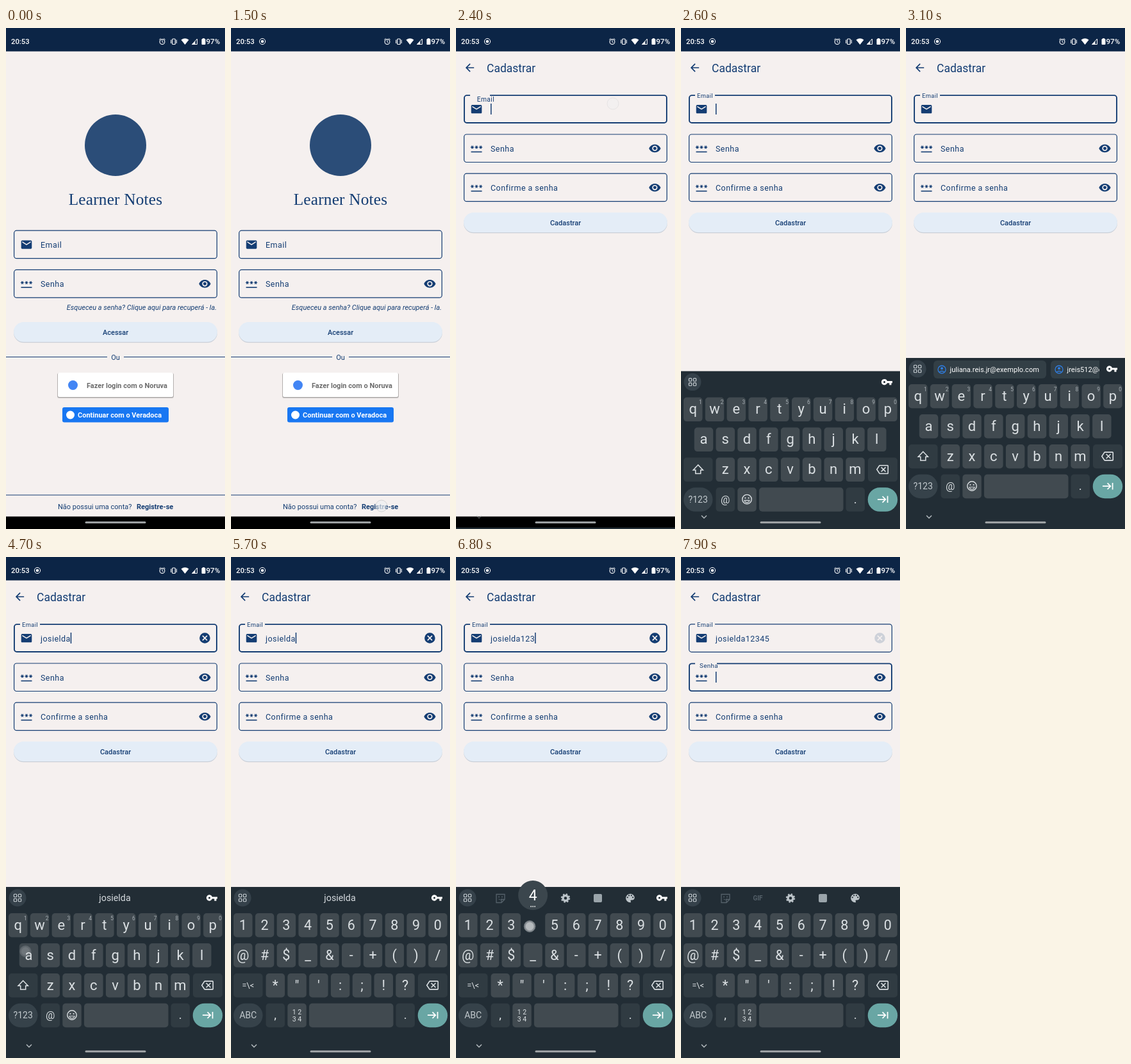
Write an HTML page that moves like this. It is 342 px wide and 782 px high and loops after 8 s.

```html
<!DOCTYPE html>
<html lang="pt">
<head>
<meta charset="utf-8">
<title>Cadastro</title>
<style>
html, body { margin: 0; width: 100%; height: 100%; overflow: hidden; background: #f5f0ef; }
svg { display: block; width: 342px; height: 782px; }
text { font-family: Roboto, "Noto Sans", sans-serif; white-space: pre; }
</style>
</head>
<body>
<svg id="stage" viewBox="0 0 342 782"></svg>
<script>
const INK = '#143d73', PAGE = '#f5f0ef', PALE = '#e4edf7', BAR = '#0c2546';
const KB = '#222d35', KEY = '#414a50', DARK = '#303b42', LIGHT = '#dbe0e3';
const LOOP = 8000;
const stage = document.getElementById('stage');

const ICON = {
  mail: 'M20 4H4c-1.1 0-2 .9-2 2v12c0 1.1.9 2 2 2h16c1.1 0 2-.9 2-2V6c0-1.1-.9-2-2-2zm0 4l-8 5-8-5V6l8 5 8-5v2z',
  eye: 'M12 4.5C7 4.5 2.7 7.6 1 12c1.7 4.4 6 7.5 11 7.5s9.3-3.1 11-7.5c-1.7-4.4-6-7.5-11-7.5zM12 17a5 5 0 1 1 0-10 5 5 0 0 1 0 10zm0-8a3 3 0 1 0 0 6 3 3 0 0 0 0-6z',
  back: 'M20 11H7.8l5.6-5.6L12 4l-8 8 8 8 1.4-1.4L7.8 13H20z',
  clear: 'M12 2a10 10 0 1 0 0 20 10 10 0 0 0 0-20zm5 13.6L15.6 17 12 13.4 8.4 17 7 15.6l3.6-3.6L7 8.4 8.4 7l3.6 3.6L15.6 7 17 8.4 13.4 12z',
  key: 'M12.6 10A6 6 0 1 0 12.6 14H17v4h4v-4h2v-4zM7 14a2 2 0 1 1 0-4 2 2 0 0 1 0 4z',
  erase: 'M22 3H7c-.7 0-1.2.4-1.6.9L0 12l5.4 8.1c.4.5.9.9 1.6.9h15c1.1 0 2-.9 2-2V5c0-1.1-.9-2-2-2zm0 16H7.1L2.4 12 7 5h15zM10.4 17L14 13.4l3.6 3.6 1.4-1.4-3.6-3.6L19 8.4 17.6 7 14 10.6 10.4 7 9 8.4l3.6 3.6L9 15.6z',
  palette: 'M12 3a9 9 0 0 0 0 18c.8 0 1.5-.7 1.5-1.5 0-.4-.1-.7-.4-1-.9-1-.2-2.5 1.1-2.5H16c2.8 0 5-2.2 5-5 0-4.4-4-8-9-8zm-5.5 9a1.5 1.5 0 1 1 0-3 1.5 1.5 0 0 1 0 3zm3-4a1.5 1.5 0 1 1 0-3 1.5 1.5 0 0 1 0 3zm5 0a1.5 1.5 0 1 1 0-3 1.5 1.5 0 0 1 0 3zm3 4a1.5 1.5 0 1 1 0-3 1.5 1.5 0 0 1 0 3z',
  shift: 'M12 3L2.5 13H7v7h10v-7h4.5z',
  enter: 'M2 12h15M11.5 6l6 6-6 6M21.5 5.5v13'
};

function set(node, attrs) {
  for (const name in attrs) node.setAttribute(name, attrs[name]);
}
function add(parent, tag, attrs = {}, text) {
  const node = document.createElementNS('http://www.w3.org/2000/svg', tag);
  set(node, attrs);
  if (text !== undefined) node.textContent = text;
  parent.appendChild(node);
  return node;
}
const group = (parent, attrs) => add(parent, 'g', attrs);
const rect = (parent, x, y, width, height, fill, rx = 0, more = {}) =>
  add(parent, 'rect', { x, y, width, height, fill, rx, ...more });
const circle = (parent, cx, cy, r, fill, more = {}) =>
  add(parent, 'circle', { cx, cy, r, fill, ...more });
const line = (parent, d, stroke, width = 1, more = {}) =>
  add(parent, 'path', { d, stroke, 'stroke-width': width, fill: 'none', ...more });
const label = (parent, x, y, size, fill, text, more = {}) =>
  add(parent, 'text', { x, y, 'font-size': size, fill, ...more }, text);
const MID = { 'text-anchor': 'middle' };
const icon = (parent, name, cx, cy, fill, scale = 0.83, more = {}) =>
  add(parent, 'path', { d: ICON[name], fill, transform: `translate(${cx - 12 * scale} ${cy - 12 * scale}) scale(${scale})`, ...more });
const fade = (node, opacity) => node.setAttribute('opacity', Number(opacity));
const ramp = (t, from, to) => Math.min(1, Math.max(0, (t - from) / (to - from)));
const easeOut = x => 1 - (1 - x) ** 3;

function passwordIcon(parent, y) {
  let d = '';
  for (const x of [25.4, 32, 38.6])
    for (let arm = 0; arm < 3; arm++) {
      const turn = Math.PI * arm / 3, dx = 2.6 * Math.cos(turn), dy = 2.6 * Math.sin(turn);
      d += `M${x - dx} ${y - 2 - dy}L${x + dx} ${y - 2 + dy}`;
    }
  line(parent, d, INK, 1.05);
  line(parent, `M23.5 ${y + 5.3}h17`, INK, 1.6);
}

// The stroke lies inside the box, so a thicker one grows inwards.
function outline(y, stroke, gap) {
  const i = stroke / 2, left = 12 + i, right = 330 - i, top = y + i, bottom = y + 44.7 - i;
  return `M${gap} ${top}H${right - 4}a4 4 0 0 1 4 4V${bottom - 4}a4 4 0 0 1-4 4H${left + 4}a4 4 0 0 1-4-4V${top + 4}a4 4 0 0 1 4-4H22`;
}

function field(parent, y, name, secret) {
  const border = line(parent, '', INK);
  if (secret) {
    passwordIcon(parent, y + 22.7);
    icon(parent, 'eye', 310.5, y + 22.5, INK);
  } else icon(parent, 'mail', 32, y + 22.5, INK);
  const hint = label(parent, 54, y, 12.5, INK, name);
  const gapEnd = secret ? 56 : 53;
  return function update(float, focused) {
    const stroke = focused ? 1.9 : 1.2;
    set(border, { d: outline(y, stroke, float > 0 ? gapEnd : 22), 'stroke-width': stroke });
    set(hint, {
      x: 54 - 29 * float, y: y + 27.2 - 22.4 * float,
      'font-size': 12.5 - 3.1 * float, 'letter-spacing': 0.45 - 0.1 * float
    });
  };
}

function pillButton(parent, y, text) {
  rect(parent, 12, y + 1.2, 318, 31, '#c9cfd8', 15.5);
  rect(parent, 12, y, 318, 31, PALE, 15.5);
  label(parent, 171, y + 19.5, 11, INK, text, { ...MID, 'font-weight': 500 });
}

// login page
const login = group(stage);
circle(login, 171, 183, 48, '#2b4d78');
label(login, 171, 276, 25.3, INK, 'Learner Notes', { ...MID, 'letter-spacing': 0.2, style: 'font-family:"Liberation Serif",serif' });
field(login, 315.6, 'Email', false)(0, false);
field(login, 376.8, 'Senha', true)(0, false);
label(login, 329, 440, 11, INK, 'Esqueceu a senha? Clique aqui para recuperá - la.', { 'text-anchor': 'end', 'font-style': 'italic' });
pillButton(login, 459, 'Acessar');
line(login, 'M0 513.5H158M184 513.5H342', INK, 1.2);
label(login, 171, 518, 11, INK, 'Ou', MID);
rect(login, 80, 538.5, 182, 39.5, '#000', 3, { opacity: 0.16 });
rect(login, 80.5, 538.5, 181, 38.3, '#000', 2, { opacity: 0.25 });
rect(login, 81, 538, 180, 38, '#fff', 2);
circle(login, 104.5, 557.5, 7.5, '#4285f4');
label(login, 126, 561.5, 11, '#6b6b6b', 'Fazer login com o Noruva', { 'font-weight': 600 });
rect(login, 88, 592, 166, 23.5, '#1877f2', 3);
circle(login, 100.5, 604, 6.5, '#fff');
label(login, 112, 608, 11, '#fff', 'Continuar com o Veradoca', { 'font-weight': 700 });
line(login, 'M0 729H342', INK, 1.2);
label(login, 81, 751, 11, INK, 'Não possui uma conta?');
label(login, 204, 751, 11, INK, 'Registre-se', { 'font-weight': 700 });

// sign-up page
const signup = group(stage);
rect(signup, 0, 36, 376, 746, PAGE);
icon(signup, 'back', 21.5, 62, INK);
label(signup, 48, 69, 17.5, INK, 'Cadastrar');
const emailField = field(signup, 104.2, 'Email', false);
const passField = field(signup, 165.4, 'Senha', true);
field(signup, 226.6, 'Confirme a senha', true)(0, false);
pillButton(signup, 288, 'Cadastrar');
const emailText = label(signup, 54, 131.5, 12.5, INK, '', { 'letter-spacing': 0.45 });
const clearIcon = icon(signup, 'clear', 310.5, 126.5, INK);
const caret = rect(signup, 54, 118, 1.5, 17, INK);

// status bar
rect(stage, 0, 0, 342, 36.5, BAR);
label(stage, 8, 25, 11.3, '#fff', '20:53', { 'font-weight': 500 });
const recorder = group(stage);
circle(recorder, 49, 21, 4.6, 'none', { stroke: '#fff' });
circle(recorder, 49, 21, 2.3, '#fff');
circle(stage, 244, 21.5, 3.9, 'none', { stroke: '#fff', 'stroke-width': 1.1 });
line(stage, 'M244 19v2.7l1.7 1M239.3 18.3l2.3-2M248.7 18.3l-2.3-2', '#fff');
rect(stage, 259.7, 17, 4.6, 8.5, 'none', 1, { stroke: '#fff', 'stroke-width': 1.2 });
line(stage, 'M257.7 18.5v5.5M266.3 18.5v5.5', '#fff', 1.1);
add(stage, 'path', { d: 'M279.5 26L273.5 18.5q6-4.5 12 0z', fill: '#fff' });
line(stage, 'M290.5 25.5h8v-8.5z', '#fff', 1);
add(stage, 'path', { d: 'M290.5 25.5h5v-5z', fill: '#fff' });
rect(stage, 305.5, 17, 6, 9, '#fff', 1);
rect(stage, 307, 16, 3, 2, '#fff');
label(stage, 312.5, 25, 11.6, '#fff', '97%', { 'font-weight': 500 });

// navigation strip
rect(stage, 0, 762.5, 342, 20, '#000');

// keyboard
const keyboard = group(stage);
rect(keyboard, 0, 515, 342, 400, KB);
circle(keyboard, 18, 532, 13.5, '#35414a');
for (const x of [12.3, 19.3])
  for (const y of [526.3, 533.3])
    rect(keyboard, x, y, 4.4, 4.4, 'none', 1, { stroke: '#cbd2d6', 'stroke-width': 1.1 });
const keyIcon = icon(keyboard, 'key', 321.5, 532, '#fff', 0.78);

const clip = add(add(stage, 'defs'), 'clipPath', { id: 'chipClip' });
rect(clip, 40, 515, 262, 36, '#fff');
const chips = group(keyboard, { 'clip-path': 'url(#chipClip)' });
function chip(x, width, text) {
  rect(chips, x, 519, width, 28, '#333f46', 6);
  circle(chips, x + 13, 533, 6, 'none', { stroke: '#2f7de0', 'stroke-width': 1.3 });
  circle(chips, x + 13, 531.2, 2, '#2f7de0');
  line(chips, `M${x + 9.5} 537q3.5-3 7 0`, '#2f7de0', 1.5);
  label(chips, x + 25.5, 537, 11.1, '#fff', text);
}
chip(43, 176, 'juliana.reis.jr@exemplo.com');
chip(226, 120, 'jreis512@exemplo');

const guess = label(keyboard, 170, 537, 14.3, '#d5dade', '', MID);

const tools = group(keyboard);
const DIM = '#55616a', TOOL = '#bcc4c9';
line(tools, 'M63 526.5h13v8l-5 5h-8zM76 534.5h-5v5', DIM, 1.3);
circle(tools, 67, 530.5, 1, DIM);
circle(tools, 72, 530.5, 1, DIM);
line(tools, 'M66.5 534q3 2.5 5.5-.5', DIM);
label(tools, 120, 536, 10, DIM, 'GIF', { ...MID, 'font-weight': 700 });
circle(tools, 171, 532.5, 4, 'none', { stroke: TOOL, 'stroke-width': 3.4 });
circle(tools, 171, 532.5, 6.2, 'none', { stroke: TOOL, 'stroke-width': 2, 'stroke-dasharray': 6.2 * Math.PI / 8 });
rect(tools, 215, 526, 13, 13, '#9aa4aa', 2);
icon(tools, 'palette', 272, 532.5, TOOL, 0.76);

const TOP = [556, 603, 650, 696.7];
const keyBox = (parent, x, row, width, fill, rx = 5) => rect(parent, x, TOP[row], width, 37.5, fill, rx);
function buildKeys(rows, starts) {
  const layer = group(keyboard), map = {};
  rows.forEach((row, r) => [...row].forEach((char, i) => {
    const x = starts[r] + i * 33.8, y = TOP[r], g = group(layer);
    const isLetter = /[a-z]/.test(char);
    keyBox(g, x, r, 29.5, KEY);
    label(g, x + 14.7, y + (isLetter ? 25.5 : 26), isLetter ? 22 : 21.5, LIGHT, char, MID);
    if (isLetter && r === 0) label(g, x + 26.3, y + 10.5, 8.3, '#a9b1b6', (i + 1) % 10, MID);
    map[char] = { x: x + 14.7, y: y + 18.5, g };
  }));
  return { layer, map };
}
function smallKey(parent, x, text, size = 19) {
  keyBox(parent, x, 3, 29.5, DARK);
  label(parent, x + 14.7, TOP[3] + 24.5, size, LIGHT, text, MID);
}
function modeKey(parent, text) {
  keyBox(parent, 4, 3, 45.5, '#36424a', 18.7);
  label(parent, 26.7, TOP[3] + 23.3, 14, '#c3cace', text, MID);
}
keyBox(keyboard, 4, 2, 45.5, DARK);
keyBox(keyboard, 292, 2, 46, DARK);
icon(keyboard, 'erase', 314.5, 668.5, LIGHT, 0.8);
keyBox(keyboard, 122, 3, 131.5, KEY);
smallKey(keyboard, 257.5, '.');
keyBox(keyboard, 291.7, 3, 46.5, '#69a6a4', 18.7);
icon(keyboard, 'enter', 315, 715.2, 'none', 0.8, { stroke: '#fff', 'stroke-width': 2.2 });

const abc = buildKeys(['qwertyuiop', 'asdfghjkl', 'zxcvbnm'], [4, 20.7, 54.5]);
icon(abc.layer, 'shift', 26.7, 668.5, 'none', 0.8, { stroke: LIGHT, 'stroke-width': 1.9 });
modeKey(abc.layer, '?123');
smallKey(abc.layer, 54.5, '@', 16);
keyBox(abc.layer, 88.3, 3, 29.5, KEY);
circle(abc.layer, 103, 715, 7.2, 'none', { stroke: LIGHT, 'stroke-width': 1.4 });
circle(abc.layer, 100.4, 713, 1.1, LIGHT);
circle(abc.layer, 105.6, 713, 1.1, LIGHT);
line(abc.layer, 'M99 716.8h8a4.1 4.1 0 0 1-8 0z', LIGHT, 1.1);

const sym = buildKeys(['1234567890', '@#$_&-+()/', '*"\':;!?'], [4, 4, 54.5]);
label(sym.layer, 26.7, 673, 13, LIGHT, '=\\<', MID);
modeKey(sym.layer, 'ABC');
smallKey(sym.layer, 54.5, ',');
keyBox(sym.layer, 88.3, 3, 29.5, KEY);
label(sym.layer, 103, 713.5, 10.5, LIGHT, '1 2', MID);
label(sym.layer, 103, 724.5, 10.5, LIGHT, '3 4', MID);

const popup = group(keyboard);
circle(popup, 0, 0, 23, '#3b464d');
const popupChar = label(popup, 0, 8, 23, '#fff', '', MID);
const popupDots = group(popup);
for (const x of [-3, 0, 3]) circle(popupDots, x, 17.5, 0.9, '#fff');

const chevron = line(stage, 'M32 761l4 4 4-4', '#b9c0c4', 1.4);
rect(stage, 123.5, 770.3, 95, 3, '#a3a7a9', 1.5);

const dot = group(stage);
circle(dot, 0, 0, 9, '#eef0f2', { opacity: 0.5, stroke: '#9aa3a8', 'stroke-width': 0.8 });
circle(dot, 0, 0, 6.5, '#eef0f2', { opacity: 0.45 });

// timeline
const HOLD = 90, SWITCH = 5500, EMAIL_FOCUS = 2342, PASS_FOCUS = 7820;
const strokes = [
  ['j', 3200], ['o', 3380], ['s', 3530], ['i', 3680], ['e', 3900], ['l', 4130], ['d', 4330], ['a', 4510],
  ['1', 5950], ['2', 6230], ['3', 6470], ['4', 6780], ['5', 7010]
].map(([char, at]) => ({ char, at, key: (at < SWITCH ? abc : sym).map[char] }));
const touches = [
  { x: 235, y: 746, at: 1400 }, { x: 245, y: 118, at: 2220 },
  { x: 27, y: 715, at: 5400 }, { x: 225, y: 188, at: 7600 },
  ...strokes.map(({ key, at }) => ({ x: key.x - 5, y: key.y + (at < SWITCH ? -6 : 2), at }))
];

function render(t) {
  fade(recorder, ramp(t, 100, 600));

  const enter = easeOut(ramp(t, 1600, 1900));
  set(signup, { opacity: enter, transform: `translate(${34 * (1 - enter)} 0)` });

  const typed = strokes.filter(s => t >= s.at + HOLD);
  const text = typed.map(s => s.char).join('');
  const hasDigit = /\d/.test(text);
  const onPass = t >= PASS_FOCUS;
  emailText.textContent = text;
  emailField(easeOut(ramp(t, EMAIL_FOCUS, EMAIL_FOCUS + 167)), t >= EMAIL_FOCUS && !onPass);
  passField(easeOut(ramp(t, PASS_FOCUS, PASS_FOCUS + 167)), onPass);
  fade(clearIcon, text ? 1 - 0.9 * ramp(t, PASS_FOCUS, PASS_FOCUS + 88) : 0);

  // the caret blinks from the latest input
  const last = typed.length ? typed[typed.length - 1].at + HOLD : EMAIL_FOCUS;
  const since = t - (onPass ? PASS_FOCUS : last);
  fade(caret, t >= EMAIL_FOCUS && since % 1000 < 500);
  set(caret, {
    x: onPass || !text ? 54 : 54 + emailText.getComputedTextLength(),
    y: onPass ? 179 : 118
  });

  const rise = easeOut(ramp(t, 2400, 2750));
  set(keyboard, { transform: `translate(0 ${267 * (1 - rise)})` });
  fade(chevron, t < 2400 ? 0 : 0.4 + 0.6 * rise);
  fade(abc.layer, t < SWITCH);
  fade(sym.layer, t >= SWITCH);
  fade(chips, text ? 0 : ramp(t, 2800, 3000));
  guess.textContent = hasDigit ? '' : text;
  fade(tools, hasDigit);
  fade(keyIcon, !onPass);

  const held = strokes.find(s => t >= s.at && t < s.at + HOLD);
  for (const s of strokes) fade(s.key.g, !held || held.key !== s.key);
  fade(popup, !!held);
  if (held) {
    set(popup, { transform: `translate(${held.key.x} ${held.key.y - 46.5})` });
    popupChar.textContent = held.char;
    fade(popupDots, /\d/.test(held.char));
  }

  const touch = touches.find(p => t >= p.at && t < p.at + 250);
  fade(dot, touch ? 1 - ramp(t, touch.at + HOLD, touch.at + 250) : 0);
  if (touch) set(dot, { transform: `translate(${touch.x} ${touch.y})` });
}

const start = performance.now();
function tick() {
  render((performance.now() - start) % LOOP);
  requestAnimationFrame(tick);
}
tick();
</script>
</body>
</html>
```
